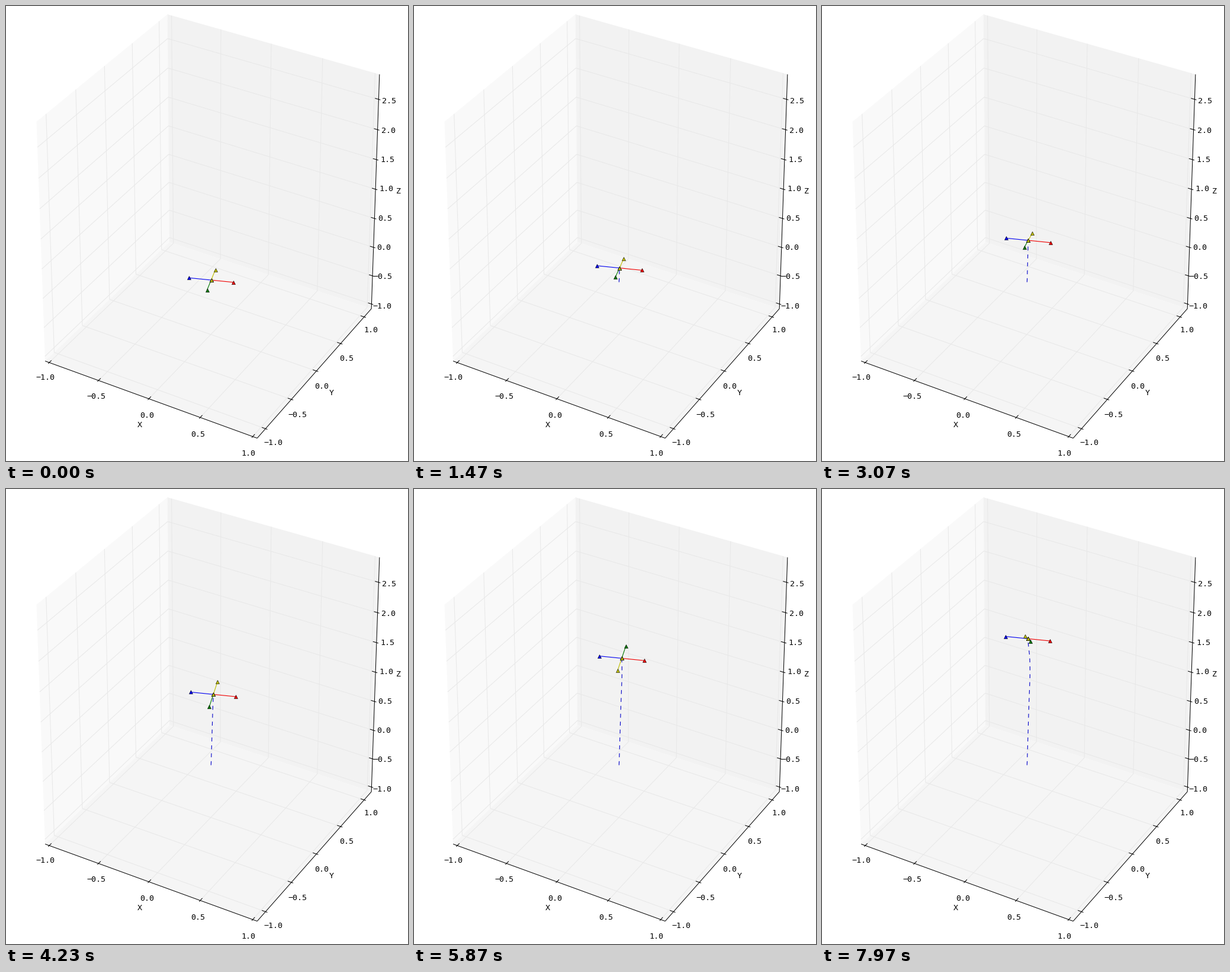
Animation of 679x767 px, one loop 8 s. Source, as a matplotlib script:

```python
import matplotlib.pyplot as plt
import numpy as np
from matplotlib.animation import FuncAnimation
from matplotlib.collections import LineCollection

W, H, DPI = 679, 767, 80
FRAMES, INTERVAL = 250, 32

LEFT_PANE, BACK_PANE, FLOOR = "#f9f9f9", "#f2f2f2", "#f5f5f5"
GRID = "#e8e8e8"

# Data range covered by the box on each axis
RANGES = ((-1.0417, 1.0417), (-1.158, 1.158), (-1.083, 2.907))
X_TICKS = np.arange(-1, 1.1, 0.5)
Y_TICKS = np.arange(-1, 1.1, 0.5)
Z_TICKS = np.arange(-1, 2.6, 0.5)
TICK_IN, TICK_OUT = 0.0167, 0.0083

# Camera at elevation 30, azimuth -60
RIGHT = np.array([0.866, 0.5, 0.0])
UP = np.array([-0.25, 0.433, 0.866])
TOWARD = np.array([0.433, -0.75, 0.5])


def project(point):
    """Turn a point of the box (each axis -0.5 to 0.5) into stage pixels."""
    p = np.asarray(point, float)
    depth = 1 - p @ TOWARD / 10
    return 345.9 + 413.4 * (p @ RIGHT) / depth, 359.1 - 460.7 * (p @ UP) / depth


def scaled(ticks, axis):
    lo, hi = RANGES[axis]
    return (ticks - lo) / (hi - lo) - 0.5


def segment(a, b):
    return [project(a), project(b)]


def smooth(times, values):
    """Cubic Hermite curve through a few knots."""
    times, values = np.array(times), np.array(values)
    slopes = np.gradient(values, times, edge_order=2)

    def curve(t):
        t = np.clip(t, times[0], times[-1])
        i = np.clip(np.searchsorted(times, t) - 1, 0, len(times) - 2)
        h = times[i + 1] - times[i]
        s = (t - times[i]) / h
        return ((1 + 2 * s) * (1 - s) ** 2 * values[i]
                + s * (1 - s) ** 2 * h * slopes[i]
                + s * s * (3 - 2 * s) * values[i + 1]
                + s * s * (s - 1) * h * slopes[i + 1])

    return curve


# The craft climbs, then flips about its red-blue arm
KNOTS = [0.17, 1.47, 3.07, 4.23, 5.07, 5.97, 6.67, 7.97]
center_x = smooth(KNOTS, [346.5, 347.1, 348.4, 350.2, 351.3, 350.7, 349.4, 347.5])
center_y = smooth(KNOTS, [462, 441, 394, 346, 312, 282.5, 270.7, 252.3])
roll = smooth(KNOTS, [0, 0.08, 0.23, -0.22, -1.37, -3.6, -5.15, -8.55])

fig = plt.figure(figsize=(W / DPI, H / DPI), dpi=DPI, facecolor="white")
ax = fig.add_axes([0, 0, 1, 1])
ax.set_xlim(0, W)
ax.set_ylim(H, 0)
ax.axis("off")


def draw_box():
    n, p = -0.5, 0.5
    panes = (
        (LEFT_PANE, [(n, n, n), (n, p, n), (n, p, p), (n, n, p)]),
        (BACK_PANE, [(n, p, n), (p, p, n), (p, p, p), (n, p, p)]),
        (FLOOR, [(n, n, n), (p, n, n), (p, p, n), (n, p, n)]),
    )
    for color, corners in panes:
        ax.fill(*zip(*map(project, corners)), color=color, lw=0, zorder=1)

    grid = []
    edges = [segment((n, n, n), (p, n, n)),
             segment((p, n, n), (p, p, n)),
             segment((p, p, n), (p, p, p))]
    for x in scaled(X_TICKS, 0):
        grid += [segment((x, n, n), (x, p, n)), segment((x, p, n), (x, p, p))]
        edges.append(segment((x, n - TICK_OUT, n), (x, n + TICK_IN, n)))
    for y in scaled(Y_TICKS, 1):
        grid += [segment((n, y, n), (p, y, n)), segment((n, y, n), (n, y, p))]
        edges.append(segment((p - TICK_IN, y, n), (p + TICK_OUT, y, n)))
    for z in scaled(Z_TICKS, 2):
        grid += [segment((n, n, z), (n, p, z)), segment((n, p, z), (p, p, z))]
        edges.append(segment((p - TICK_IN, p, z), (p + TICK_OUT, p, z)))
    ax.add_collection(LineCollection(grid, colors=GRID, lw=0.9, zorder=2))
    ax.add_collection(LineCollection(edges, colors="black", lw=0.9, zorder=3))


def label(x, y, text):
    ax.text(x, y, text, family="DejaVu Sans Mono", size=12, color="black",
            ha="center", va="center_baseline", zorder=4)


def label_ticks(ticks, first, last):
    """Spread the numbers along a line between the two end labels."""
    spots = np.linspace(first, last, len(ticks))
    for (x, y), value in zip(spots, ticks):
        label(x, y, f"{value:.1f}".replace("-", "\u2212"))


draw_box()
label_ticks(X_TICKS, (66.5, 625), (409.5, 752.5))
label_ticks(Y_TICKS, (451, 735), (616, 545.5))
label_ticks(Z_TICKS, (635, 504.5), (647.5, 159.5))
label(226, 705, "X")
label(550, 650.5, "Y")
label(662.5, 311, "Z")

trail, = ax.plot([], [], color="#0000c8", lw=1, zorder=5,
                 dashes=(6, 6), dash_capstyle="butt")


def make_arm(color, order):
    line, = ax.plot([], [], color=color, lw=1, marker="^", ms=6,
                    mec="black", mew=0.5, zorder=order)
    return line


red, blue, green, yellow = (
    make_arm(c, 6 + i) for i, c in
    enumerate(("#f00000", "#0000f0", "#007800", "#bfbf00")))


def update(i):
    t = i * INTERVAL / 1000
    cx, cy = center_x(t), center_y(t)
    angle = roll(t)
    side = 37.8, 3.8
    front = -7 * np.cos(angle), 17 * np.cos(angle) - 20 * np.sin(angle)

    for arm, (dx, dy), sign in ((red, side, 1), (blue, side, -1),
                                (green, front, 1), (yellow, front, -1)):
        arm.set_data([cx, cx + sign * dx], [cy, cy + sign * dy])

    past = np.linspace(0, t, 2 + i)
    trail.set_data(np.r_[346.3, center_x(past)], np.r_[465.5, center_y(past)])
    return trail, red, blue, green, yellow


anim = FuncAnimation(fig, update, frames=FRAMES, interval=INTERVAL,
                     repeat=True, repeat_delay=0, blit=False)
plt.show()
```
